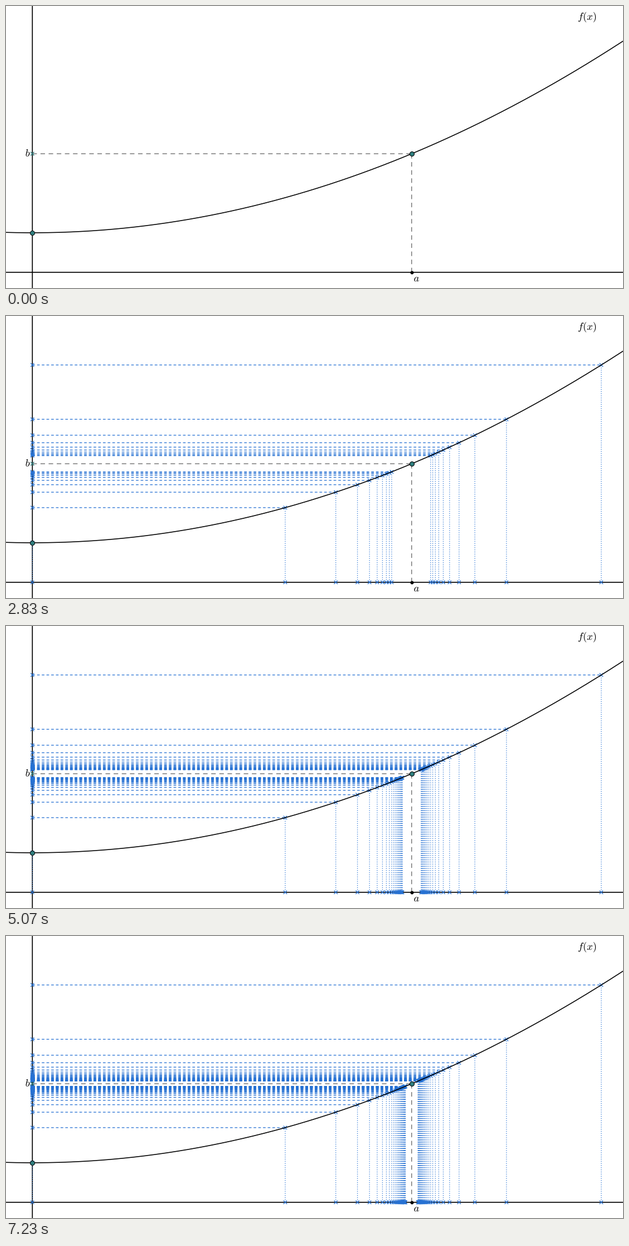
Animation, 1107 px wide and 506 px high, one loop 7730 ms. Source, as a matplotlib script:

```python
import numpy as np
import matplotlib.pyplot as plt
from matplotlib.animation import FuncAnimation
from matplotlib.collections import LineCollection
from matplotlib.patches import PathPatch
from matplotlib.textpath import TextPath
from matplotlib.transforms import Affine2D

W, H, DPI = 1107, 506, 64
PT = 72 / DPI                     # points per pixel
LOOP, FRAMES = 7730, 93

X0, Y0 = 47.3, 477.8              # origin on the stage
UX, UY = 340.25, 70.9             # pixels per unit
A = 2                             # the limit point

BLUE, TEAL, GREY = "#2671d3", "#308080", "#616161"
SCALE = 0.853                     # stroke scale
PEN = 1.5 * SCALE                 # width of the helper lines

FIRST, LAST = 11, 87              # frames in which points appear
PAUSES = {15, 20, 23, 27, 31, 37, 43, 47, 51, 55, 59, 63, 68, 72, 75, 79, 83}
DOUBLES = {25, 74}

plt.rcParams["mathtext.fontset"] = "cm"
plt.rcParams["lines.scale_dashes"] = False


def f(x):
    return 1 + x**2 / 2


def px(x, y):
    return X0 + UX * x, Y0 - UY * y


def dash(base):
    on = base * SCALE + PEN
    return (0, (on * PT, 0.8 * on * PT))


def cross(x, y, r=3.2):
    cx, cy = px(x, y)
    return [[(cx - r, cy - r), (cx + r, cy + r)],
            [(cx - r, cy + r), (cx + r, cy - r)]]


def lines(segments, color, width, z, style="solid"):
    return ax.add_collection(LineCollection(
        segments, colors=color, linewidths=width * PT, linestyles=style,
        zorder=z, capstyle="butt", snap=False), autolim=False)


def dot(x, y, size, color):
    cx, cy = px(x, y)
    ax.plot([cx], [cy], "o", ms=size * PT, mfc=color, mec="black",
            mew=PT, zorder=8)


def label(left, base, s):
    path = TextPath((0, 0), s, size=18.5)
    move = Affine2D().translate(-path.get_extents().x0, 0)
    path = path.transformed(move.scale(1, -1).translate(left, base))
    ax.add_patch(PathPatch(path, fc="black", lw=0, zorder=9, snap=False))


def shown(i):
    """Number of points visible in frame i."""
    return sum(0 if j in PAUSES else 2 if j in DOUBLES else 1
               for j in range(FIRST, min(i, LAST) + 1))


def sequence(n):
    """First n points, alternately left and right of A."""
    for m in range(n):
        k = m // 2 + 1
        yield A + 1 / k if m % 2 else A - 1 / (k - 0.5)


fig = plt.figure(figsize=(W / DPI, H / DPI), dpi=DPI, facecolor="white")
ax = fig.add_axes([0, 0, 1, 1])
ax.set_xlim(0, W)
ax.set_ylim(H, 0)
ax.axis("off")

# Axes, curve and the limit
lines([[(X0, 0), (X0, H)], [(0, Y0), (W, Y0)]], "black", 2 * SCALE, 1)
lines([[px(0, f(A)), px(A, f(A))], [px(A, 0), px(A, f(A))]],
      GREY, PEN, 3, dash(8))
xs = np.linspace(-0.2, 3.2, 300)
ax.plot(*px(xs, f(xs)), color="black", lw=1.6 * PT, zorder=6)

lines(cross(0, f(A)), TEAL, 1.4, 7)
dot(0, f(0), 8, TEAL)
dot(A, f(A), 8, TEAL)
dot(A, 0, 5, "black")

label(1027, 24.7, "$f(x)$")
label(35.6, 270, "$b$")
label(732.3, 494.3, "$a$")

# Points approaching the limit
across = lines([], BLUE, PEN, 2, dash(4))
down = lines([], BLUE, PEN, 2, (0, (PEN * PT, 3 * SCALE * PT)))
marks = lines([], BLUE, 1.25, 5)


def update(i):
    pts = [(x, f(x)) for x in sequence(shown(i))]
    across.set_segments([[px(0, y), px(x, y)] for x, y in pts if x > 0])
    down.set_segments([[px(x, 0), px(x, y)] for x, y in pts])
    marks.set_segments([s for x, y in pts
                        for p in ((x, y), (x, 0), (0, y))
                        for s in cross(*p)])
    return across, down, marks


anim = FuncAnimation(fig, update, frames=FRAMES, interval=LOOP / FRAMES,
                     repeat=True, repeat_delay=0, blit=False)
plt.show()
```
